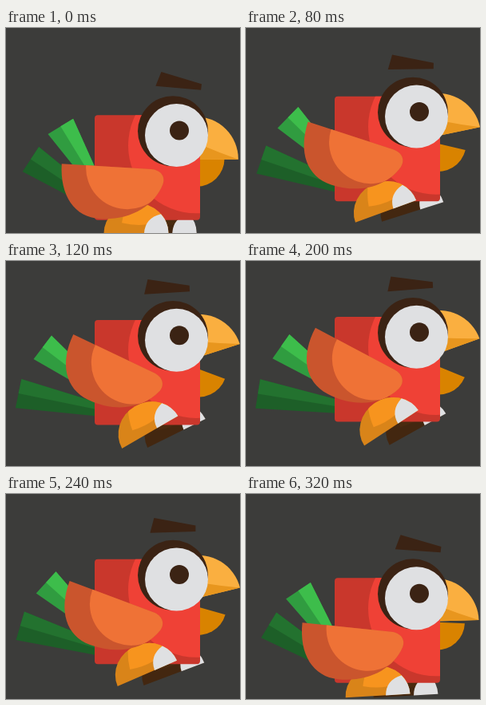
Recreate the animation shown at these times as an HTML page with a canvas. Size 293 px wide and 257 px high, loop 0.36 s.

```html
<!DOCTYPE html>
<html lang="en">
<head>
<meta charset="utf-8">
<title>Flapping bird</title>
<style>
  html, body { margin: 0; width: 100%; height: 100%; overflow: hidden; background: #3c3c3a; }
  canvas { display: block; }
</style>
</head>
<body>
<canvas id="stage" width="293" height="257"></canvas>
<script>
const ctx = document.getElementById('stage').getContext('2d');
const PERIOD = 360, STEP = 40, LEAD = 40 / 3;
const BROWN = '#3b2314', WHITE = '#dfe0e2';

const shapes = {
  upperBeak: new Path2D('M237 55H291A54 53.5 0 0 0 237 1.5Z'),
  beakShade: new Path2D('M237 55H291Q268 47 244 37L237 30Z'),
  lowerBeak: new Path2D('M238.5 54.5H273.5A35 35 0 0 1 238.5 89.5Z'),
  brow: new Path2D('M-28.5 0L-23 -18.4L28.7 -7.5L28.5 0Z'),
  wing: new Path2D('M0 0H112C124 0 131 8 128 18C119 46 90 66 52 66C20 66 0 40 0 0Z'),
  foot: new Path2D('M-35.5 36A40.5 37.5 0 0 1 45.5 36Z'),
  footLight: new Path2D('M-4 -4Q-11 10 -13 23Q4 27 18 25L46 20V-10Z'),
  toe: new Path2D('M15 36Q16 17 36 12A40.5 37.5 0 0 1 45.5 36Z'),
  body: new Path2D()
};
shapes.body.roundRect(111, 0, 132, 131.5, 4);

function fill(path, color) {
  ctx.fillStyle = color;
  ctx.fill(path);
}

function disc(x, y, r, color) {
  const path = new Path2D();
  path.arc(x, y, r, 0, Math.PI * 2);
  fill(path, color);
}

// Runs draw with the origin at (x, y), turned clockwise by degrees.
function turned(x, y, degrees, draw) {
  ctx.save();
  ctx.translate(x, y);
  ctx.rotate(degrees * Math.PI / 180);
  draw();
  ctx.restore();
}

function clipped(path, draw) {
  ctx.save();
  ctx.clip(path);
  draw();
  ctx.restore();
}

// Turns shapes given in body coordinates around a pivot.
function hinged(x, y, degrees, draw) {
  turned(x, y, degrees, () => { ctx.translate(-x, -y); draw(); });
}

function feather(x, y, degrees, length, light, dark) {
  turned(x, y, degrees, () => {
    fill(new Path2D(`M0 -8L${-length} -18.5V18.5L0 8Z`), dark);
    fill(new Path2D(`M0 -8L${-length} -18.5V0H0Z`), light);
  });
}

function foot(x, degrees, light, dark) {
  turned(x, 112, degrees, () => {
    fill(shapes.foot, dark);
    clipped(shapes.foot, () => fill(shapes.footLight, light));
    fill(shapes.toe, WHITE);
  });
}

function drawBird(time) {
  const phase = (time + LEAD) % PERIOD / PERIOD;
  const lift = phase < 0.5 ? phase * 2 : 2 - phase * 2;
  const browSlide = phase < 0.4 ? phase / 0.4 : (1 - phase) / 0.6;

  ctx.fillStyle = '#3c3c3a';
  ctx.fillRect(0, 0, 293, 257);
  ctx.save();
  ctx.translate(0, 113.2 - 53 * lift);

  feather(118, 113, 36 - 33 * lift, 104.5, '#23722f', '#1d5f28');
  feather(111, 84, 61 - 32 * lift, 82, '#3dbd4b', '#309c40');
  foot(193, 2.5 - 39 * lift, '#4a2b10', '#432710');

  hinged(220, 66, 30 * lift - 2, () => fill(shapes.lowerBeak, '#d98300'));
  hinged(212, 37, 2.3 - 27 * lift, () => {
    fill(shapes.upperBeak, '#faaf40');
    fill(shapes.beakShade, '#e8961e');
  });

  fill(shapes.body, '#c9372c');
  clipped(shapes.body, () => disc(238, 38, 85, '#ef4136'));
  foot(158, 3.3 - 45 * lift, '#f7941e', '#d98419');

  disc(209, 20, 44, BROWN);
  disc(213.5, 25.3, 39.5, WHITE);
  disc(217, 19.3, 12, BROWN);
  turned(217.3 - 17 * browSlide, -34, 6 - 13 * lift, () => fill(shapes.brow, BROWN));

  turned(187, 77, 1 + 33 * lift, () => {
    ctx.translate(-118, -9);
    fill(shapes.wing, '#ca552d');
    clipped(shapes.wing, () => disc(82.5, 0, 52, '#ef7236'));
  });
  ctx.restore();
}

const start = performance.now();
function tick() {
  const elapsed = Math.max(0, performance.now() - start) % PERIOD;
  drawBird(Math.floor(elapsed / STEP) * STEP);
  requestAnimationFrame(tick);
}
tick();
</script>
</body>
</html>
```
